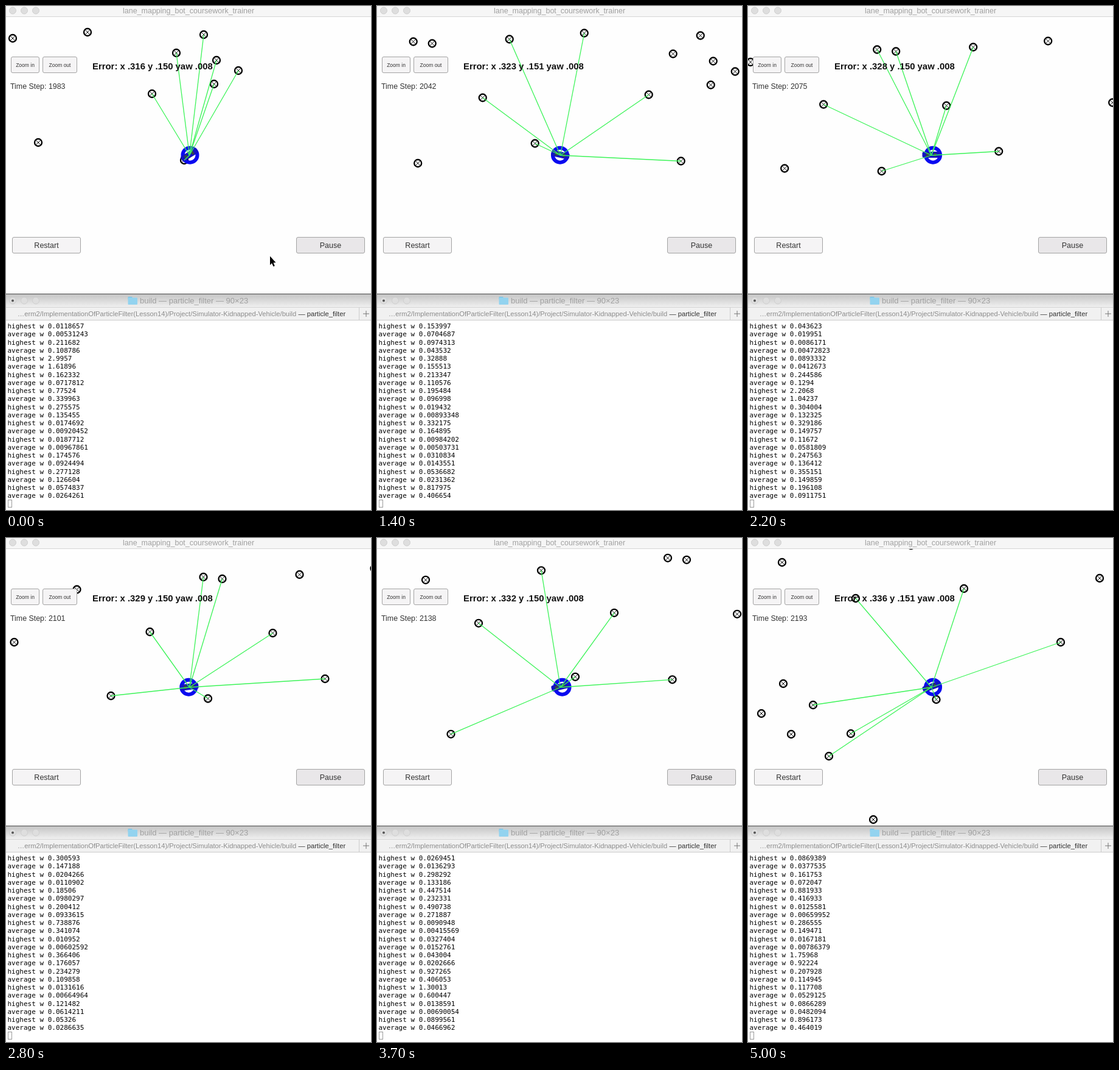
Recreate the animation shown at these times as an HTML page with a canvas. Size 600 px wide and 827 px high, loop 5.1 s.

```html
<!DOCTYPE html>
<html lang="en">
<head>
<meta charset="utf-8">
<title>Particle filter run</title>
<style>
  html, body { margin: 0; width: 100%; height: 100%; overflow: hidden; background: #fff; }
  canvas { display: block; }
</style>
</head>
<body>
<canvas id="stage" width="600" height="827"></canvas>
<script>
const ctx = document.getElementById('stage').getContext('2d');
const SANS = '"Liberation Sans", Arial, sans-serif';
const MONO = '"DejaVu Sans Mono", monospace';
const TICK = 100, TICKS = 51;
const CAR = { x: 301.5, y: 245, range: 229 };

// Scroll of the world, as key points of a smooth curve: tick, x, y
const path = [
  [0, 0, 0], [6, 83.7, -27], [12, 174, -7], [14, 206.7, 1.5], [22, 359.2, 14.5],
  [28, 471.5, 7], [37, 625, -24.2], [50, 813, -81]
];

// Map of the world
const landmarks = [
  [11, 53], [134, 43], [280, 77], [325, 47], [346, 89], [382, 106], [342, 128],
  [240, 144], [53, 224], [293, 253], [-33, 149], [-147, 57], [-116, 60],
  [-139.5, 256.5], [-235, 147], [-299, 252], [-355, 77.5], [-458, 164],
  [-545, 93], [-503.5, 346], [-757, 121], [-636, 180], [-755, 320], [-706, 355],
  [-791, 369], [-742, 403], [-644, 402], [-680, 439], [-607, 543]
];

const stepAt = tick => Math.round(1983 + 4.2 * tick);

function random(seed) {
  const v = Math.sin(seed * 12.9898) * 43758.5453;
  return v - Math.floor(v);
}

// Highest and average particle weight of one time step
function weightsAt(step) {
  const highest = 10 ** (-2.3 + 2.8 * random(step));
  const average = highest * (.42 + .14 * random(step + .5));
  return [highest, average].map(v => String(+v.toPrecision(6)));
}

function errorsAt(tick) {
  const x = Math.min(316 + .55 * tick, 322 + .28 * tick);
  const y = 150.2 + .5 * Math.cos((tick - 14) * Math.PI / 18);
  return [Math.floor(x + 1e-6), Math.round(y)];
}

const slope = (i, axis) =>
  (path[i + 1][axis] - path[i][axis]) / (path[i + 1][0] - path[i][0]);

function tangent(i, axis) {
  const last = path.length - 1;
  if (i === 0) return 2 * slope(0, axis) - tangent(1, axis);
  if (i === last) return 2 * slope(last - 1, axis) - tangent(last - 1, axis);
  const before = path[i][0] - path[i - 1][0], after = path[i + 1][0] - path[i][0];
  return (after * slope(i - 1, axis) + before * slope(i, axis)) / (before + after);
}

// Cubic Hermite curve through the path points
function scrollAt(tick) {
  let i = 0;
  while (i < path.length - 2 && tick >= path[i + 1][0]) i++;
  const a = path[i], b = path[i + 1], h = b[0] - a[0], u = (tick - a[0]) / h;
  return [1, 2].map(axis =>
    a[axis] + (b[axis] - a[axis]) * u * u * (3 - 2 * u) +
    h * u * (1 - u) * ((1 - u) * tangent(i, axis) - u * tangent(i + 1, axis)));
}

function rect(x, y, w, h, color) {
  ctx.fillStyle = color;
  ctx.fillRect(x, y, w, h);
}

function line(x1, y1, x2, y2, color, width = 1) {
  ctx.strokeStyle = color;
  ctx.lineWidth = width;
  ctx.beginPath();
  ctx.moveTo(x1, y1);
  ctx.lineTo(x2, y2);
  ctx.stroke();
}

function circle(x, y, r, fill, stroke, width = 1) {
  ctx.beginPath();
  ctx.arc(x, y, r, 0, 7);
  if (fill) { ctx.fillStyle = fill; ctx.fill(); }
  if (stroke) { ctx.strokeStyle = stroke; ctx.lineWidth = width; ctx.stroke(); }
}

function text(str, x, y, font, color, align = 'left') {
  ctx.font = font;
  ctx.fillStyle = color;
  ctx.textAlign = align;
  ctx.fillText(str, x, y);
}

function box(x, y, w, h, radius, fill, stroke) {
  ctx.beginPath();
  ctx.roundRect(x, y, w, h, radius);
  ctx.fillStyle = fill;
  ctx.fill();
  if (!stroke) return;
  ctx.strokeStyle = stroke;
  ctx.lineWidth = 1;
  ctx.stroke();
}

function button(label, x, y, w, size, fill = '#f5f4f5') {
  box(x + .5, y + .5, w, 26, 2.5, fill, '#a3a3a3');
  text(label, x + w / 2 + .5, y + 13.5 + size * .36, `${size}px ${SANS}`, '#333', 'center');
}

function windowDots(y) {
  for (const x of [11, 30, 49]) circle(x, y, 5.5, '#dedede', '#cfcfcf');
}

function drawLandmark(x, y) {
  circle(x, y, 6, null, '#000', 2.3);
  line(x - 4, y - 4, x + 4, y + 4, '#111');
  line(x - 4, y + 4, x + 4, y - 4, '#111');
}

function drawCar(tick) {
  const [x0, y0] = scrollAt(tick - .5), [x1, y1] = scrollAt(tick + .5);
  circle(302.5 + 2.2 * Math.sin(tick * Math.PI / 8), 244.7, 12, null, '#0a0af0', 6);
  ctx.save();
  ctx.translate(CAR.x, CAR.y - 1);
  ctx.rotate(Math.atan2(y0 - y1, x0 - x1));
  box(-15, -5, 30, 10, 3, '#1212c4');
  rect(-8, -3, 4, 6, '#34434f');
  rect(4, -3, 5, 6, '#34434f');
  ctx.restore();
}

function drawScene(tick) {
  const [dx, dy] = scrollAt(tick);
  const points = landmarks.map(([x, y]) => [x + dx, y + dy]);
  ctx.save();
  ctx.beginPath();
  ctx.rect(0, 18, 600, 454);
  ctx.clip();
  for (const [x, y] of points) drawLandmark(x, y);
  drawCar(tick);
  for (const [x, y] of points) {
    if (Math.hypot(x - CAR.x, y - CAR.y) < CAR.range) line(CAR.x, CAR.y, x, y, '#3cf458', 1.3);
  }
  ctx.restore();
}

function drawPointer() {
  ctx.beginPath();
  [[434, 410.5], [434, 425], [437, 422], [439.5, 427.5], [441.8, 426.5], [439.5, 421.3], [443.5, 421]]
    .forEach(([x, y]) => ctx.lineTo(x, y));
  ctx.closePath();
  ctx.lineWidth = 1.5;
  ctx.strokeStyle = '#fff';
  ctx.stroke();
  ctx.fillStyle = '#000';
  ctx.fill();
}

function drawSimulator(tick) {
  const [errorX, errorY] = errorsAt(tick);
  rect(0, 0, 600, 472, '#fefefe');
  drawScene(tick);
  rect(0, 0, 600, 17, '#f6f6f6');
  rect(0, 17, 600, 1, '#d6d6d6');
  windowDots(7.5);
  text('lane_mapping_bot_coursework_trainer', 300, 12, `12.5px ${SANS}`, '#a0a0a0', 'center');
  button('Zoom in', 8, 83, 46, 8.5);
  button('Zoom out', 60, 83, 56, 8.5);
  button('Restart', 10, 379, 112, 12.5);
  button('Pause', 477, 379, 112, 12.5, '#e9e7e9');
  text(`Time Step: ${stepAt(tick)}`, 7, 136, `12.4px ${SANS}`, '#333');
  text(`Error: x .${errorX} y .${errorY} yaw .008`, 142, 104, `bold 14.9px ${SANS}`, '#111');
  if (tick === 0) drawPointer();
}

function drawTerminal(tick) {
  rect(0, 472, 600, 355, '#fff');
  const shade = ctx.createLinearGradient(0, 473, 0, 494);
  shade.addColorStop(0, '#c4c4c4');
  shade.addColorStop(1, '#f0f0f0');
  rect(0, 472, 600, 22, shade);
  rect(0, 472, 600, 1, '#4a4a4a');
  windowDots(483.5);
  circle(11, 483.5, 2, '#555');
  box(200.5, 477, 7, 5, 1, '#7cc4e6');
  box(200.5, 478.5, 15.5, 11.5, 1, '#93d3ef');
  text('build — particle_filter — 90×23', 220, 488, `13px ${SANS}`, '#a0a0a0');

  rect(0, 494, 600, 22, '#f1f1f1');
  rect(0, 494, 600, 1, '#d4d4d4');
  rect(0, 515, 600, 1, '#cccccc');
  rect(580, 495, 1, 20, '#cccccc');
  const folder = '…erm2/ImplementationOfParticleFilter(Lesson14)/Project/Simulator-Kidnapped-Vehicle/build ';
  text(folder, 19, 509, `11.2px ${SANS}`, '#8c8c8c');
  text('— particle_filter', 19 + ctx.measureText(folder).width, 509, `11.2px ${SANS}`, '#333');
  line(587, 505, 597, 505, '#777');
  line(592, 500, 592, 510, '#777');

  for (let i = 0; i < 22; i++) {
    const value = weightsAt(stepAt(tick) - 10 + (i >> 1))[i % 2];
    text(`${i % 2 ? 'average' : 'highest'} w ${value}`, 2.5, 529 + i * 13.26, `11px ${MONO}`, '#000');
  }
  ctx.strokeStyle = '#9a9a9a';
  ctx.lineWidth = 1;
  ctx.strokeRect(3.5, 810.5, 6, 12);
}

function frame(now) {
  const tick = Math.floor(now / TICK) % TICKS;
  drawSimulator(tick);
  drawTerminal(tick);
  requestAnimationFrame(frame);
}
requestAnimationFrame(frame);
</script>
</body>
</html>
```
